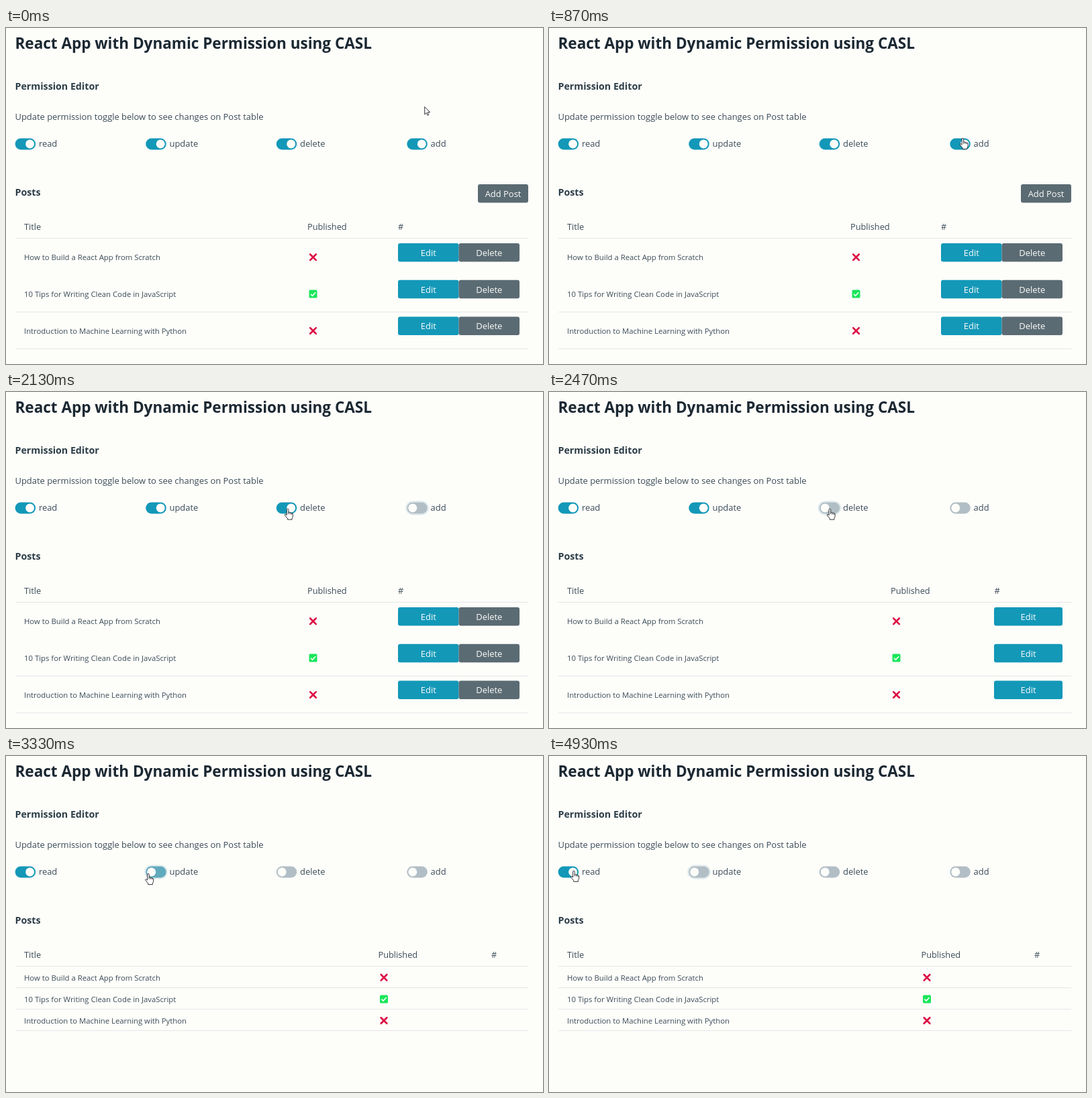
Write an HTML page that moves like this. It is 800 px wide and 501 px high and loops after 4990 ms.

```html
<!DOCTYPE html>
<html lang="en">
<head>
<meta charset="utf-8">
<title>Dynamic permissions</title>
<style>
  html, body { margin: 0; width: 100%; height: 100%; overflow: hidden; background: #fdfdfa; }
  svg { display: block; width: 800px; height: 501px; }
  text { font: 12.95px "Open Sans", "Noto Sans", sans-serif; fill: #3b4c57; }
  .h1 { font-size: 22.52px; font-weight: 700; fill: #1b2832; }
  .h2 { font-size: 14.22px; font-weight: 700; fill: #2c3d47; }
  .head { font-size: 12.75px; }
  .cell { font-size: 11.33px; }
  .label { fill: #fdfdfa; text-anchor: middle; }
  .primary { fill: #1398b8; }
  .secondary { fill: #5b6b73; }
  .line { stroke: #e4e8ea; }
  .cross { stroke: #dd1144; stroke-width: 2.7; fill: none; stroke-linecap: round; }
  .tick { stroke: #fff; stroke-width: 1.5; fill: none; }
  .ring { fill: none; stroke: #dde9ec; stroke-width: 2; }
  .cursor { fill: #fff; stroke: #1c2024; stroke-width: .9; stroke-linejoin: round; }
</style>
</head>
<body>
<svg viewBox="0 0 800 501">
  <g id="page"></g>
  <g id="switches"></g>
  <g id="table"></g>
  <path id="arrow" class="cursor" d="M0 0V11.3L2.6 8.9 4.3 12.7 6 12 4.4 8.2H8Z"/>
  <path id="hand" class="cursor" d="M-1.4 1.2a1.3 1.3 0 0 1 2.6 0V5.5q2.2-.6 2.4.5q2-.4 2.2.6q1.8-.2 1.8 1.2V11q0 1.5-1.2 3V16H-.2V14.6L-4 9.8q-.8-1.2.2-1.7q1.2-.3 2.4 1.5ZM1.2 5.5V8M3.6 6V8.2M5.8 6.6V8.6"/>
</svg>
<script>
const LOOP = 4990, STEP = 66.5;
const ON = [19, 152, 184], OFF = [178, 190, 197];
const $ = id => document.getElementById(id);

// name, left edge, right edge of the label, time of the click
const switches = [
  { name: "read", x: 13.6, end: 76, click: Infinity },
  { name: "update", x: 208.2, end: 286, click: 3227 },
  { name: "delete", x: 402.7, end: 476, click: 2240 },
  { name: "add", x: 597.3, end: 656, click: 1500 }
];
const [, update, remove, add] = switches;

const posts = [
  ["How to Build a React App from Scratch", false],
  ["10 Tips for Writing Clean Code in JavaScript", true],
  ["Introduction to Machine Learning with Python", false]
];

const layouts = {
  full: { published: 449, hash: 584, first: 341.8, gap: 54.8, lines: [423.5, 478.5],
          buttons: [["Edit", "primary", 584, 90.5], ["Delete", "secondary", 674.5, 90.5]] },
  edit: { published: 509, hash: 663.5, first: 341.8, gap: 54.8, lines: [423.5, 478.5],
          buttons: [["Edit", "primary", 663, 102]] },
  bare: { published: 554.5, hash: 723, first: 330.3, gap: 32.1, lines: [345.5, 377.5, 409.5],
          buttons: [] }
};

// time, x, y of the pointer tip; it eases from stop to stop
const path = [
  [0, 623.7, 117.5], [70, 623.7, 117.5], [340, 616.5, 164.6], [1000, 616.5, 164.6],
  [1250, 612.5, 168.5], [1670, 612.5, 168.5], [2070, 419.7, 174.2], [2150, 419.7, 174.2],
  [2300, 418.5, 174.2], [2730, 418.5, 174.2], [3140, 212, 175.6], [3460, 212, 175.6],
  [3930, 33, 174], [4250, 37, 171.3], [LOOP, 37, 171.3]
];

const clamp = v => Math.max(0, Math.min(1, v));
const ease = v => v * v * (3 - 2 * v);
const mix = (a, b, k) => a + (b - a) * k;

const text = (x, y, cls, s) => `<text x="${x}" y="${y}" class="${cls}">${s}</text>`;
const line = y => `<path class="line" d="M14 ${y}H778"/>`;
const button = (s, cls, x, y, w) =>
  `<rect class="${cls}" x="${x}" y="${y}" width="${w}" height="27.4" rx="3"/>` +
  text(x + w / 2, y + 18.8, "label", s);

function mark(x, y, yes) {
  const shape = yes
    ? `<rect x="-6" y="-6" width="12" height="12" rx="1.5" fill="#18e65a"/><path class="tick" d="M-3.5 .2L-1 2.7 3.7-2.4"/>`
    : `<path class="cross" d="M-4.3-4.3L4.3 4.3M4.3-4.3L-4.3 4.3"/>`;
  return `<g transform="translate(${x} ${y})">${shape}</g>`;
}

function table(o) {
  let out = text(o.published, 300.5, "head", "Published") + text(o.hash, 300.5, "head", "#");
  posts.forEach(([title, yes], i) => {
    const y = o.first + i * o.gap;
    out += text(27, y + 4.2, "cell", title) + mark(o.published + 8.5, y, yes);
    for (const [s, cls, x, w] of o.buttons) out += button(s, cls, x, y - 20.8, w);
  });
  return out + o.lines.map(line).join("");
}

$("page").innerHTML =
  text(13.5, 31, "h1", "React App with Dynamic Permission using CASL") +
  text(13.5, 92, "h2", "Permission Editor") +
  text(13.5, 136.7, "", "Update permission toggle below to see changes on Post table") +
  text(13.5, 249.7, "h2", "Posts") +
  text(27, 300.5, "head", "Title") + line(313.5) +
  `<g id="addPost">${button("Add Post", "secondary", 703, 233, 75)}</g>`;

$("switches").innerHTML = switches.map(s =>
  `<g transform="translate(${s.x} 164.4)">
    <rect class="ring" x="-1" y="-1" width="32.5" height="19" rx="9.5"/>
    <rect class="track" width="30.5" height="17" rx="8.5"/>
    <circle class="knob" cy="8.5" r="6.5" fill="#fdfdfa"/>
    ${text(35.3, 12.9, "", s.name)}
  </g>`).join("");
[...$("switches").children].forEach((g, i) => {
  for (const part of ["ring", "track", "knob"]) switches[i][part] = g.querySelector("." + part);
});

function pointerAt(t) {
  const i = Math.max(1, path.findIndex(p => p[0] > t));
  const [t0, x0, y0] = path[i - 1], [t1, x1, y1] = path[i];
  const k = ease(clamp((t - t0) / (t1 - t0)));
  return [mix(x0, x1, k), mix(y0, y1, k)];
}

let shown;
function draw(t) {
  const focused = [update, remove, add].find(s => t >= s.click);
  for (const s of switches) {
    const since = t - s.click;
    const slide = ease(clamp(since / 100)), fade = ease(clamp(since / 200));
    s.knob.setAttribute("cx", mix(22, 8.5, slide));
    s.track.setAttribute("fill", `rgb(${ON.map((c, i) => Math.round(mix(c, OFF[i], fade)))})`);
    s.ring.style.display = s === focused ? "" : "none";
  }

  $("addPost").style.display = t < add.click ? "" : "none";
  const layout = t < remove.click ? "full" : t < update.click ? "edit" : "bare";
  if (layout !== shown) $("table").innerHTML = table(layouts[shown = layout]);

  const [x, y] = pointerAt(t);
  const over = y > 160 && y < 186 && switches.some(s => x >= s.x - 1 && x <= s.end);
  for (const id of ["arrow", "hand"]) {
    $(id).setAttribute("transform", `translate(${x} ${y})`);
    $(id).style.display = (id === "hand") === over ? "" : "none";
  }
}

const start = performance.now();
function tick() {
  const t = (performance.now() - start) % LOOP;
  draw(Math.floor((t + 2) / STEP) * STEP);
  requestAnimationFrame(tick);
}
tick();
</script>
</body>
</html>
```
